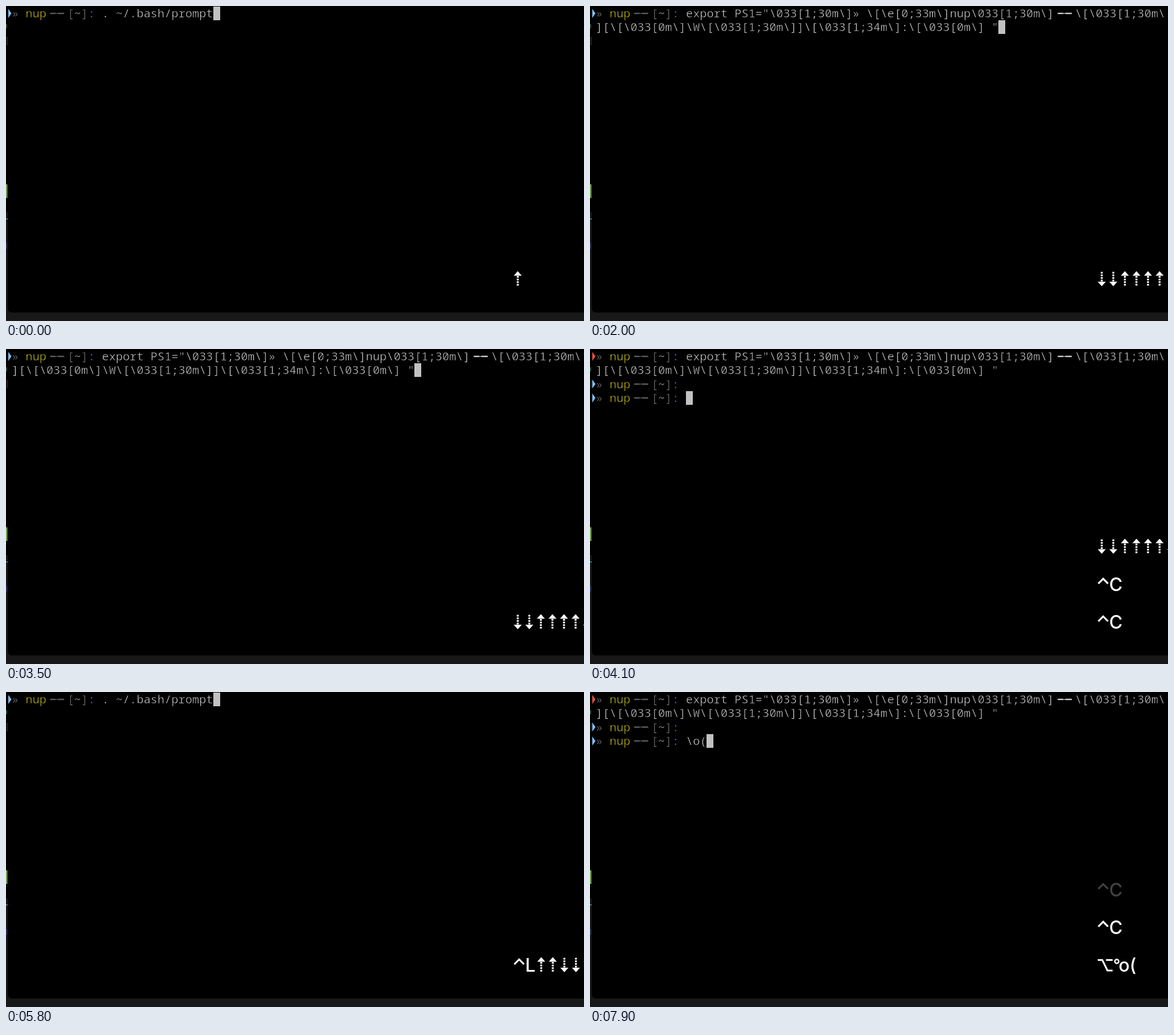
These frames come from a looping animation (1012x553 px, 8 s). An HTML page with a canvas:

```html
<!DOCTYPE html>
<html lang="en">
<head>
<meta charset="utf-8">
<title>Terminal with key display</title>
<style>
html, body { margin: 0; width: 100%; height: 100%; overflow: hidden; background: #000; }
canvas { display: block; width: 1012px; height: 553px; }
</style>
</head>
<body>
<canvas id="stage" width="1012" height="553"></canvas>
<script>
const ctx = document.getElementById('stage').getContext('2d');
const LOOP = 8000, STEP = 100;
const CELL = 12.16, LINE = 24.3, LEFT = 9.9, FIRST_COL = 13;
const HOLD = 1350, FADE = 270;
const HOST = 'nup';
const MONO = '300 20.27px "Noto Sans Mono", "DejaVu Sans Mono", monospace';
const SANS = '500 32px Inter, Roboto, sans-serif';
const TEXT = '#c6c6c6', GREY = '#7a7a7a', BLUE = '#80bdf2', RED = '#e0523f';

const HISTORY = [
  [''],
  ['. ~/.bash/prompt'],
  ['export PS1="\\033[1;30m\\]» \\[\\e[0;33m\\]' + HOST + '\\033[1;30m\\]', '\\[\\033[1;30m\\',
   '][\\[\\033[0m\\]\\W\\[\\033[1;30m\\]]\\[\\033[1;34m\\]:\\[\\033[0m\\] "']
];

// time, keys shown, starts a new row
const KEYS = [
  [0, '↑', 1], [200, '↑'],
  [700, '↓', 1], [900, '↓'], [1200, '↑'], [1500, '↑'], [1700, '↑'], [2000, '↑'], [2500, '↓'], [3100, '↑'],
  [3600, '^C', 1], [3900, '^C', 1],
  [4700, '^L', 1], [4900, '↑'], [5100, '↑'], [5300, '↓'], [5500, '↓'], [5700, '↑'], [6000, '↑'],
  [6350, '^C', 1], [6600, '^C', 1],
  [6900, '⌥°', 1], [7300, 'o'], [7700, '(']
];

function stateAt(t) {
  const s = { rows: [], hist: 0, breaks: 0, typed: '' };
  for (const [at, keys, fresh] of KEYS) {
    if (at > t) break;
    if (fresh) s.rows.push({ keys: '', last: at });
    const row = s.rows[s.rows.length - 1];
    row.keys += keys;
    row.last = at;
    if (keys === '↑') s.hist = Math.min(2, s.hist + 1);
    else if (keys === '↓') s.hist = Math.max(0, s.hist - 1);
    else if (keys === '^C') s.breaks++;
    else if (keys === '^L') { s.breaks = 0; s.hist = 0; }
    else s.typed += keys === '⌥°' ? '\\' : keys;
  }
  return s;
}

function rect(x, y, w, h, color) {
  ctx.fillStyle = color;
  ctx.fillRect(x, y, w, h);
}

function poly(points, color) {
  ctx.fillStyle = color;
  ctx.beginPath();
  points.forEach(([x, y]) => ctx.lineTo(x, y));
  ctx.fill();
}

function line(points, width) {
  ctx.lineWidth = width;
  ctx.beginPath();
  points.forEach(([x, y], i) => i ? ctx.lineTo(x, y) : ctx.moveTo(x, y));
  ctx.stroke();
}

const colX = col => LEFT + col * CELL;

// The thin black outline gives the letters a light weight
function put(text, col, row, color) {
  const x = colX(col), y = 20 + row * LINE;
  ctx.font = MONO;
  ctx.fillStyle = color;
  ctx.fillText(text, x, y);
  ctx.strokeStyle = '#000';
  ctx.lineWidth = 0.45;
  ctx.lineJoin = 'round';
  ctx.strokeText(text, x, y);
}

function dashes(col, row, color) {
  const x = colX(col) + 6, y = 13 + row * LINE;
  rect(x, y - 0.6, 25, 1.2, color);
  rect(x + 1, y - 1.2, 9, 2.4, color);
  rect(x + 14, y - 1.2, 11, 2.4, color);
}

function prompt(row, mark) {
  const y = 13 + row * LINE;
  poly([[4, y - 8], [9.6, y], [4, y + 8]], mark);
  put('»', 0, row, GREY);
  put(HOST, 2, row, '#bab41c');
  dashes(5, row, '#5c5c5c');
  put('[', 8, row, GREY);
  put('~', 9, row, TEXT);
  put(']', 10, row, GREY);
  put(':', 11, row, '#6265ff');
}

function command(index) {
  const parts = HISTORY[index];
  put(parts[0], FIRST_COL, 0, TEXT);
  const col = FIRST_COL + parts[0].length;
  if (parts.length === 1) return [col, 0];
  dashes(col, 0, '#d0d0d0');
  put(parts[1], col + 3, 0, TEXT);
  put(parts[2], 0, 1, TEXT);
  return [parts[2].length, 1];
}

function terminal(s) {
  prompt(0, s.breaks ? RED : BLUE);
  let [col, row] = command(s.hist);
  for (let i = 0; i < s.breaks; i++) prompt(row = 2 + i, BLUE);
  if (s.breaks) {
    put(s.typed, FIRST_COL, row, TEXT);
    col = FIRST_COL + s.typed.length;
  }
  rect(Math.round(colX(col)), Math.round(1 + row * LINE), 12, 24, '#c2c2c2');
}

function arrow(x, y, up) {
  const cx = x + 10, base = up ? y - 25.5 : y + 1, dir = up ? 1 : -1;
  poly([[cx - 7, base + 8 * dir], [cx, base], [cx + 7, base + 8 * dir]], '#fff');
  for (let i = 0; i < 4; i++) rect(cx - 1.7, base + (10 + i * 4.6) * dir - 1.5, 3.4, 3, '#fff');
}

// Draws one key at its baseline and returns its advance
function key(ch, x, y) {
  switch (ch) {
    case '↑':
    case '↓':
      arrow(x, y, ch === '↑');
      return 20.25;
    case '^':
      line([[x + 4, y - 13], [x + 12.5, y - 21.5], [x + 21, y - 13]], 3.1);
      return 23;
    case '⌥':
      line([[x + 3, y - 20.5], [x + 11, y - 20.5], [x + 20, y - 2], [x + 29, y - 2]], 3.1);
      line([[x + 17.5, y - 20.5], [x + 29, y - 20.5]], 3.1);
      return 31.5;
    case '°':
      ctx.lineWidth = 2.5;
      ctx.beginPath();
      ctx.arc(x + 4.8, y - 18, 3.4, 0, 2 * Math.PI);
      ctx.stroke();
      return 8;
  }
  ctx.font = SANS;
  ctx.fillStyle = '#fff';
  ctx.fillText(ch, x, y);
  return ctx.measureText(ch).width;
}

function keyRows(rows, t) {
  ctx.strokeStyle = '#fff';
  ctx.lineJoin = 'miter';
  rows.forEach((row, i) => {
    const age = t - row.last;
    ctx.globalAlpha = Math.max(0, Math.min(1, 1 - (age - HOLD) / FADE));
    if (!ctx.globalAlpha) return;
    const y = 491 - 66.2 * (rows.length - 1 - i);
    let x = 886;
    for (const ch of row.keys) x += key(ch, x, y);
  });
  ctx.globalAlpha = 1;
}

function desktop() {
  rect(0, 0, 1012, 553, '#000');
  rect(0, 362, 12, 191, '#171719');
  rect(0, 530, 1012, 23, '#181818');
  ctx.fillStyle = '#000';
  ctx.beginPath();
  ctx.roundRect(3, -20, 1030, 558, 7);
  ctx.fill();
  rect(0, 32, 2, 7, '#2c4a40');
  rect(1.5, 54, 1.2, 15, '#383838');
  rect(0, 313, 2.5, 24, '#73a052');
  rect(0, 373, 3, 1.5, '#35a5c8');
  rect(0, 416, 2, 10, '#2b2b58');
}

function draw(now) {
  const t = Math.floor((now % LOOP) / STEP) * STEP;
  const s = stateAt(t);
  desktop();
  terminal(s);
  keyRows(s.rows, t);
  requestAnimationFrame(draw);
}
requestAnimationFrame(draw);
</script>
</body>
</html>
```
